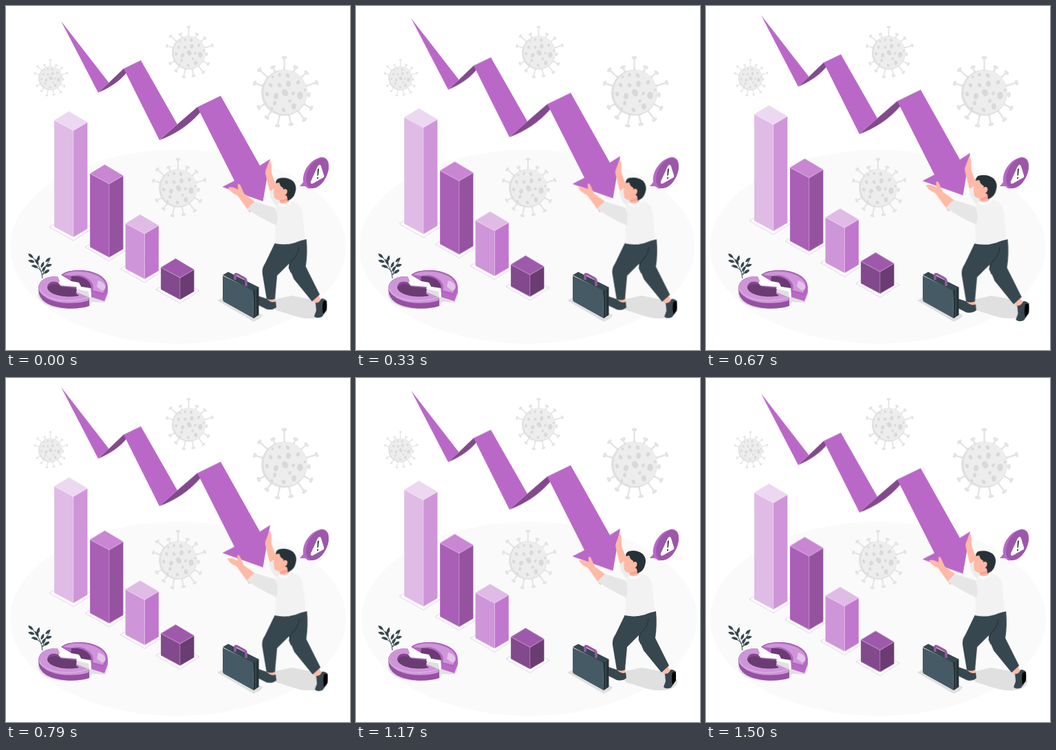
Write an HTML page that moves like this. It is 500 px wide and 500 px high and loops after 1540 ms.

```html
<!DOCTYPE html>
<html lang="en">
<head>
<meta charset="utf-8">
<title>Falling chart</title>
<style>
  html, body { margin: 0; width: 100%; height: 100%; overflow: hidden; background: #fff; }
  svg { display: block; width: 100vw; height: 100vh; }
  .fall { animation: fall 1540ms -43ms infinite linear; }
  .man { transform-origin: 394px 339px; animation: beat 1540ms -43ms infinite linear; }
  .floor { animation: drift 1540ms infinite linear; }
  @keyframes fall {
    0%, 100% { transform: translateY(.5px); }
    50% { transform: translateY(-9.6px); }
  }
  @keyframes beat {
    0%, 28% { transform: scale(1); }
    14% { transform: scale(1.08); }
    42% { transform: scale(1.08); animation-timing-function: ease-out; }
    72%, 100% { transform: scale(1); }
  }
  @keyframes drift {
    0%, 50%, 100% { transform: none; }
    25% { transform: translateX(-1.8px); }
    75% { transform: translateX(2px); }
  }
  .skin { fill: #ffb9a5; }
  .dark { fill: #263238; }
  .slate { fill: #37474f; }
  .steel { fill: #455a64; }
  .shade { fill: #e0e0e0; }
  .mid { fill: #ba68c8; }
  .deep { fill: #82498c; }
</style>
</head>
<body>
<svg viewBox="0 0 500 500" preserveAspectRatio="none">
  <defs><g id="virus"></g></defs>

  <ellipse class="floor" cx="250" cy="350" rx="244" ry="141" fill="#fafafa"/>

  <use href="#virus" transform="translate(404.5 126)"/>
  <use href="#virus" transform="translate(265.5 68) scale(.73)"/>
  <use href="#virus" transform="translate(64.5 105) scale(.52)"/>
  <use href="#virus" transform="translate(250 265) scale(.83)"/>

  <!-- plant -->
  <g class="slate" id="plant">
    <path d="M53 396Q52 380 37 363M53 391Q55 380 63 370M52 386Q46 379 37 378M53 391Q57 386 63 385" fill="none" stroke="#37474f"/>
  </g>

  <!-- broken ring -->
  <path class="shade" d="M46 418C48 441 91 445 122 436L125 430L144 431L149 417L110 400Z"/>
  <path class="mid" d="M80 391C88 384 104 383 119 385C138 389 148 398 148 409V416L143 429L124 423L123 408L92 402Z"/>
  <path d="M80 391C88 384 104 383 119 385C138 389 148 398 147 409L142 421L124 415C128 406 121 395 106 393L95 393L95 400Z" fill="#b065be"/>
  <path d="M83 391C91 385 105 385 118 387C136 391 146 399 145 409L141 417L126 413C130 405 121 393 106 391L94 392Z" fill="#cf95d9"/>
  <path d="M134 399Q146 403 144 411L140 414L132 408Z" fill="#e3c3e9"/>
  <path d="M95 393C111 391 124 399 124 410L109 408L107 403L94 401Z" fill="#6b3b73"/>
  <path d="M47 411C47 398 60 392 75 393L79 403L103 408L102 416L121 424V436C104 442 75 441 59 432Q47 425 47 411Z" fill="#9550a3"/>
  <path d="M47 410C48 398 60 392 75 393L79 403L103 408L102 416L121 424L120 428C101 434 76 433 60 425Q48 418 47 410Z" fill="#cf95d9"/>
  <path d="M49 411C51 423 75 430 97 428Q110 427 120 423" fill="none" stroke="#e0bce6"/>
  <path d="M60 408C62 399 71 400 77 402L80 407L103 409L102 418L106 421C88 425 61 420 60 408Z" class="deep"/>
  <path d="M60 409C66 402 77 404 79 408L102 411L102 418L106 421C88 425 61 420 60 409Z" fill="#6b3b73"/>
  <path d="M75 393L80 391L95 400L106 402L109 408L123 411L124 423L121 424L120 415L102 411L103 408L79 406L76 402L80 398Z" fill="#fff"/>

  <g class="fall">
    <g id="bars"></g>
    <path class="deep" d="M134 126L149 112L171 91L180 92L176 96Q162 114 134 126ZM223 195L249 172L278 147L287 149L281 156Q258 182 223 195Z"/>
    <path class="mid" d="M80 22L149.500 111.500L134 126ZM171 91L196 79L249 172L223 195ZM278 147L312 130.500L369 232L384 222.500L373.500 284L314.500 263L332 254Z"/>
  </g>

  <!-- alert bubble -->
  <path class="mid" d="M427 262L432 256C430 240 443 222 459 219.500C466 220 470 225 469 235C467 253 451 267 439 265L435 262Z"/>
  <ellipse cx="452.500" cy="243" rx="14" ry="23.500" transform="rotate(27 452.500 243)" fill="#9c57a9"/>
  <path d="M455 231Q457 230 458 233L462 246Q463 249 460 250L446 258Q442 259 443 255L453 233Z" fill="#fff"/>
  <path d="M452.800 237L455 236L454 246L452.500 247ZM452 249.500L454 248.500V250.500L452 251.500Z" class="dark"/>

  <path class="shade" d="M383 428L415 421L447 427L467 438Q469 445 460 451Q444 457 424 452L392 442Z"/>

  <g class="man">
    <!-- shoes and ankles -->
    <path class="skin" d="M379 421L392 421L391 431L380 430ZM443 424L452 417L457 426L449 432Z"/>
    <path class="slate" d="M367 420L379 424Q386 431 392 428L393 436Q388 441 379 439L367 433Z"/>
    <path class="slate" d="M449 430Q455 430 457 424Q461 423 465 427L465 440L458 450Q450 453 447 449L450 441Z"/>
    <path d="M460 428L464.500 427Q466 435 464 441L460 446Q458 437 460 428Z" fill="#000"/>
    <!-- trousers -->
    <path class="slate" d="M411 345L436 339Q438 359 435 378L455 418L444 428L418 396L411 379Z"/>
    <path class="slate" d="M391 344Q414 349 432 342Q429 360 414 371L394 391L391 424Q385 427 379 424L373 388Q372 380 377 373Z"/>
    <path d="M425 350Q424 362 414 371L411 380L414 387" fill="none" stroke="#263238"/>
    <!-- raised far arm -->
    <path class="skin" d="M383 225.500Q386 228 386 235L386 244L394 266L389 278L383 268L378 248Q376 243 379 237Z"/>
    <path d="M383 271L390 266L402 287L394 292Q385 285 383 271Z" fill="#ececec"/>
    <!-- torso -->
    <path d="M394 289L415 285Q427 287 430 298L434 337Q415 350 391 345Q394 325 388 306Z" fill="#f2f2f2"/>
    <path class="skin" d="M397 278L412 279L411 287Q404 291 398 288Z"/>
    <path d="M396 286Q404 291 413 284L414 288Q405 295 397 291Z" fill="#fafafa"/>
    <!-- near arm -->
    <path class="skin" d="M324 265Q330 263 338 268L338 260Q341 259 343 265L347 274L366 288L355 301L337 276Q327 272 324 265Z"/>
    <path d="M362 285L391 294Q397 306 393 319Q381 314 369 307L351 296Q356 290 362 285Z" fill="#e6e6e6"/>
    <!-- head -->
    <path class="skin" d="M392 259L389 271L390 279Q393 284 402 283L411 278L414 262L404 256Z"/>
    <path class="dark" d="M392 259Q392 254 396 252Q408 249 417 256Q423 263 420 272Q418 281 409 284L408 277Q402 277 403 266L399 263L397 258Z"/>
    <ellipse class="skin" cx="405" cy="271.500" rx="3.300" ry="4.500" transform="rotate(20 405 271.500)"/>
    <path d="M398 283Q404 283 409 279L409 283Q404 287 398 285Z" fill="#f28f8f" opacity=".6"/>
  </g>

  <!-- briefcase -->
  <path class="shade" d="M307 428L316 423L373 449Q373 453 360 459Z"/>
  <path class="steel" d="M315 392L359 413L360 454L317 430Q315 429 315 426Z"/>
  <path class="slate" d="M315 391L323 386.500L368 409L359 414Z"/>
  <path class="dark" d="M359 413.500L367.500 409V449L360 454Z"/>
  <path d="M363 411.500V451" stroke="#455a64"/>
  <path d="M333 398V391Q333 389 336 390L347 396Q349 397 349 400V407" fill="none" stroke="#9c57a9" stroke-width="3.500"/>
</svg>
<script>
  const el = (tag, attrs, parent) => {
    const node = document.createElementNS('http://www.w3.org/2000/svg', tag);
    for (const key in attrs) node.setAttribute(key, attrs[key]);
    return parent.appendChild(node);
  };
  const byId = id => document.getElementById(id);

  // virus, drawn once at full size
  const virus = byId('virus');
  const spikes = [[0, -52], [17, -38], [33, -30], [48, -15], [37, 3], [40, 23], [30, 40],
    [10, 47], [-10, 49], [-26, 37], [-38, 22], [-44, -14], [-37, -34], [-17, -38]];
  for (const [x, y] of spikes) {
    const a = Math.atan2(y, x) * 180 / Math.PI, r = Math.hypot(x, y);
    const g = el('g', { transform: `rotate(${a})`, fill: '#e4e4e4' }, virus);
    el('path', { d: `M30 -2.500L36 -1.200H${r}V1.200H36L30 2.500Z` }, g);
    el('ellipse', { cx: r - 1, rx: 2.3, ry: 4 }, g);
  }
  el('circle', { r: 33.5, fill: '#e0e0e0' }, virus);
  el('ellipse', { cx: 1.5, cy: -.8, rx: 31.5, ry: 32, fill: '#ededed' }, virus);
  const spots = [[-7, -11, 3], [6, -13, 4], [5, -25, 3], [-7, -26, 2.5], [-17, -23, 2], [20, -15, 3],
    [23, 4, 5], [1, 0, 5], [-12, 5, 4], [-25, 2, 3], [13, 1, 2.5], [14, 20, 4], [-1, 25, 3],
    [-14, 15, 3], [-20, -11, 3], [8, 12, 2.5], [-18, 23, 2], [30, -4, 2]];
  spots.forEach(([cx, cy, r], i) => el('ellipse', {
    cx, cy, rx: r * .85, ry: r * 1.1, fill: '#d9d9d9',
    transform: `rotate(${i * 47 % 80 - 40} ${cx} ${cy})`
  }, virus));

  // leaves: x, y, angle
  [[36, 363, 40], [37, 371, 15], [42, 378.5, 20], [47, 367, -75], [45, 372, 60], [61, 369, -40],
    [62, 377, -15], [59, 386, -35], [53, 376, -65], [55, 382, -55]].forEach(([x, y, a]) =>
    el('path', { d: 'M-5 0Q0 -4 5 0Q0 4 -5 0Z', transform: `translate(${x} ${y}) rotate(${a})` }, byId('plant')));

  // bars: left x, left top y, height, colours of top, left and right faces
  const bar = (x, y, h, top, left, right) => {
    const g = el('g', { 'stroke-linejoin': 'round' }, byId('bars'));
    const b = y + h;
    const face = (d, fill) => el('path', { d, fill, stroke: '#fff', 'stroke-opacity': .28, 'stroke-width': .8 }, g);
    el('path', { d: `M${x - 7} ${b}l28 -16l35 18l-28 18Z`, fill: '#fff', stroke: '#dcc5e2', 'stroke-width': .8 }, g);
    face(`M${x} ${y}l28 15v${h}l-28 -15Z`, left);
    face(`M${x + 28} ${y + 15}l20.500 -12v${h}l-20.500 12Z`, right);
    face(`M${x} ${y}l21.500 -13l27 16l-20.500 12Z`, top);
  };
  bar(70, 166, 155, '#ecd8f0', '#e0bbe6', '#cf95d9');
  bar(122, 243.5, 107, '#c986d3', '#a95fb6', '#95539f');
  bar(173.5, 316, 66, '#e0bbe6', '#cf95d9', '#c177ce');
  bar(225, 380, 32, '#9f59ab', '#82498c', '#6b3b73');
</script>
</body>
</html>
```
